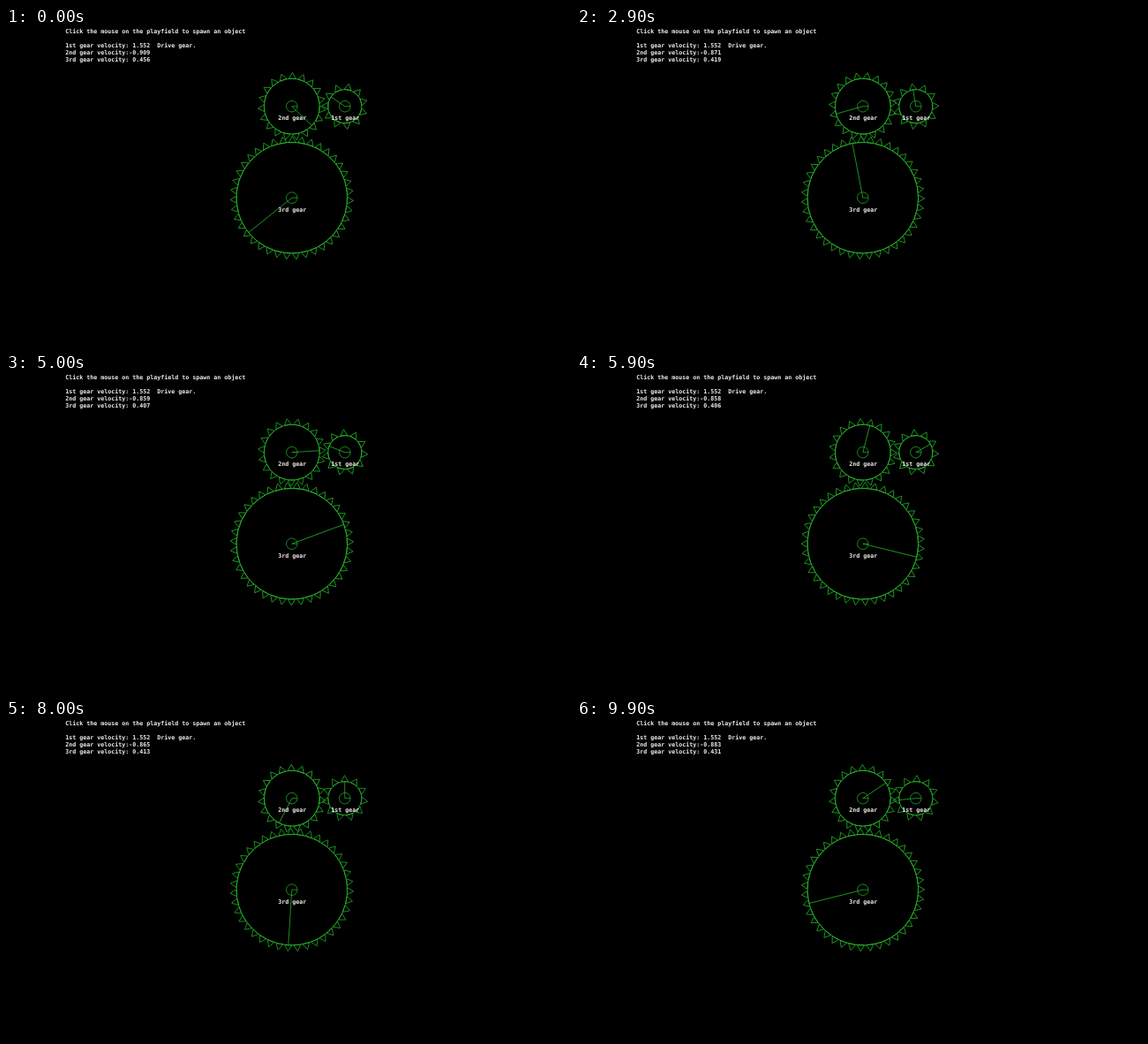
Animation of 640 by 360 pixels, one loop 10000 ms. Source, as an HTML page with a canvas:

```html
<!DOCTYPE html>
<html lang="en">
<head>
<meta charset="utf-8">
<title>Gear train</title>
<style>
  html, body { margin: 0; width: 100%; height: 100%; overflow: hidden; background: #000; }
  canvas { display: block; width: 640px; height: 360px; }
</style>
</head>
<body>
<canvas id="stage" width="640" height="360"></canvas>
<script>
const ctx = document.getElementById('stage').getContext('2d');
const LOOP = 10000, STEP = 100;
const TOOTH_HEIGHT = 7, TOOTH_HALF = 4, TOOTH_PITCH = 10.1, HUB = 6.3;
const LINE = '#1fa024', RIM = '#2ab42e', TEXT = '#f0eeea';

// Driven gears start a little fast, then settle to a steady rate.
const settle = s => 1 - Math.exp(-s / 1.2);
// Their speed readings sink until mid-loop and rise again.
const dip = s => (1 - s / 5.8) ** 2;

// Angles are in degrees, clockwise from the right; s is in seconds.
const gears = [
  { name: '1st gear', x: 383.8, y: 88.7, r: 19,
    angle: s => 214.5 + 141.4 * s - 4 * Math.sin(s * Math.PI / 5),
    speed: () => 1.552 },
  { name: '2nd gear', x: 323.8, y: 88.7, r: 31.4,
    angle: s => 43.7 - 79.6 * s - 9.5 * settle(s),
    speed: s => -0.858 - 0.051 * dip(s) },
  { name: '3rd gear', x: 323.8, y: 192.2, r: 62.8,
    angle: s => 141.2 + 38 * s + 8.5 * settle(s),
    speed: s => 0.406 + 0.05 * dip(s) }
];

function circle(r, color) {
  ctx.strokeStyle = color;
  ctx.beginPath();
  ctx.arc(0, 0, r, 0, Math.PI * 2);
  ctx.stroke();
}

function spoke(length) {
  ctx.strokeStyle = LINE;
  ctx.beginPath();
  ctx.moveTo(0, 0);
  ctx.lineTo(length, 0);
  ctx.stroke();
}

function drawTeeth(r) {
  const count = Math.floor(2 * Math.PI * r / TOOTH_PITCH);
  ctx.beginPath();
  for (let i = 0; i < count; i++) {
    ctx.moveTo(r, -TOOTH_HALF);
    ctx.lineTo(r + TOOTH_HEIGHT, 0);
    ctx.lineTo(r, TOOTH_HALF);
    ctx.closePath();
    ctx.rotate(2 * Math.PI / count);
  }
  ctx.stroke();
}

function drawGear(gear, s) {
  ctx.save();
  ctx.translate(gear.x, gear.y);
  circle(HUB, LINE);
  spoke(HUB);
  ctx.rotate(gear.angle(s) * Math.PI / 180);
  spoke(gear.r);
  drawTeeth(gear.r);
  circle(gear.r, RIM);
  ctx.restore();
}

function formatSpeed(v) {
  return (v < 0 ? '-' : ' ') + Math.abs(v).toFixed(3);
}

function draw(s) {
  ctx.fillStyle = '#000';
  ctx.fillRect(0, 0, 640, 360);
  ctx.lineWidth = 0.85;
  for (const gear of gears) drawGear(gear, s);

  ctx.font = 'bold 6.65px "DejaVu Sans Mono", monospace';
  ctx.fillStyle = TEXT;
  ctx.fillText('Click the mouse on the playfield to spawn an object', 67.3, 6);
  gears.forEach((gear, i) => {
    const note = i === 0 ? '  Drive gear.' : '';
    const speed = formatSpeed(gear.speed(s));
    ctx.fillText(`${gear.name} velocity:${speed}${note}`, 67.3, 22 + i * 8);
    ctx.fillText(gear.name, gear.x - 15.6, Math.round(gear.y + 15.5));
  });
}

const start = performance.now();
function tick() {
  const t = (performance.now() - start) % LOOP;
  draw(Math.floor(t / STEP) * STEP / 1000);
  requestAnimationFrame(tick);
}
tick();
</script>
</body>
</html>
```
